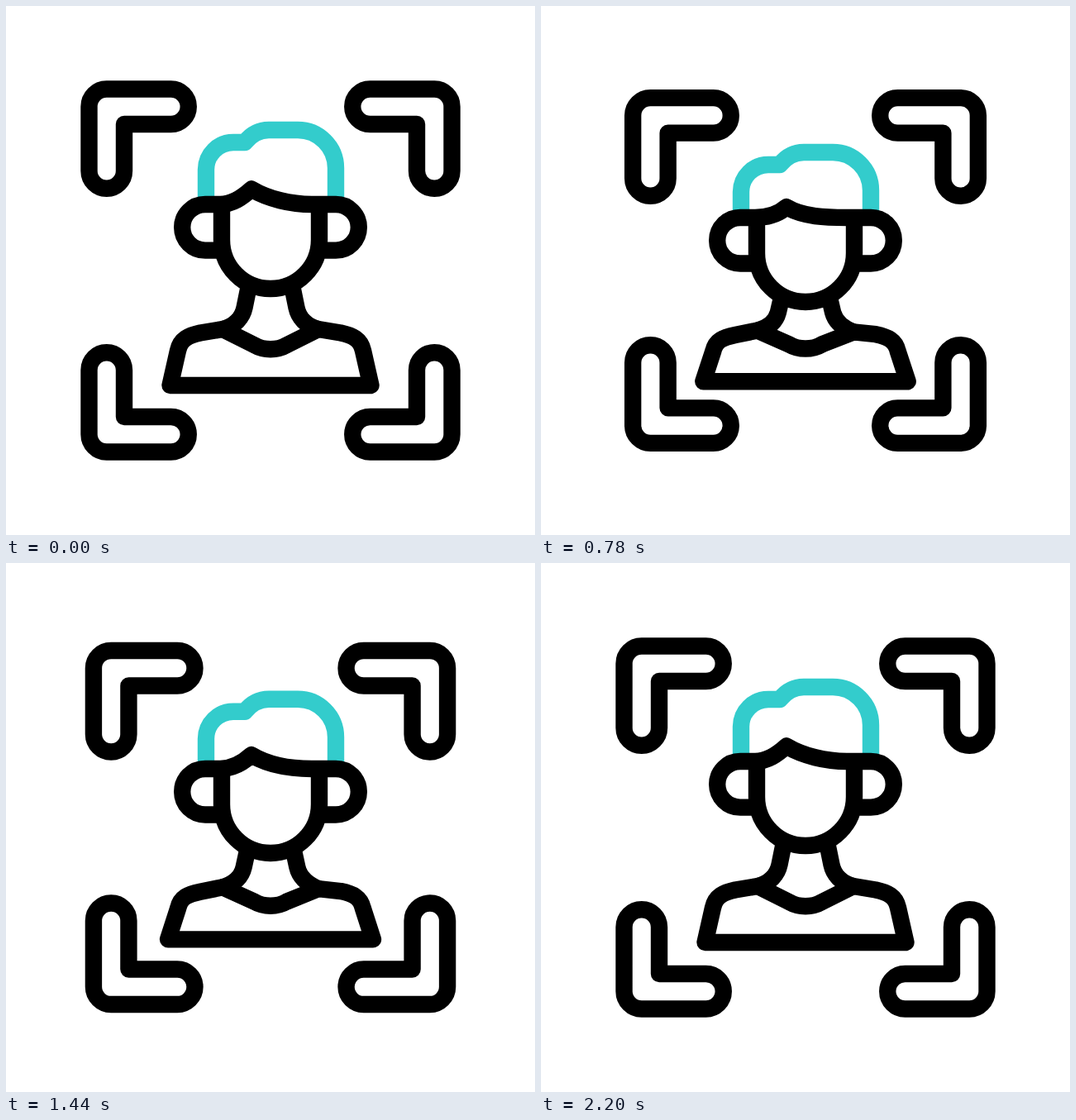
An HTML page for the animation above (2280 ms loop, 640x640 px).

```html
<!DOCTYPE html>
<html lang="en">
<head>
<meta charset="utf-8">
<title>Face scan</title>
<style>
  html, body { margin: 0; width: 100%; height: 100%; overflow: hidden; background: #fff; }
  svg { display: block; width: 100vw; height: 100vh; }
  path { fill: none; stroke: #000; stroke-width: 20.4; stroke-linejoin: round; }
  #hair { stroke: #33cccc; }
</style>
</head>
<body>
<svg viewBox="0 0 640 640">
  <g id="frame"></g>
  <path id="hair"/>
  <path id="neck"/>
  <path id="body"/>
  <path id="head"/>
</svg>
<script>
const LOOP = 2280, START = 200, STEP = 20, LAST = 100;
const $ = id => document.getElementById(id);

// Weights of the squeezed and the stretched pose: [step, squeeze, stretch]
const track = (in1, out1, hold, in2, out2, squeeze, stretch) => [
  [0, 0, 0], [in1, 1, 0], [out1, 0, 1], [hold, 0, 1],
  [in2, squeeze, 0], [out2, 0, stretch], [LAST, 0, 0]
];
const tracks = {
  frame: track(21, 43.4, 54, 68, 82.5, 1, .5),
  body: track(21, 45, 53, 67, 87.4, 1, .5),
  head: track(21, 45.5, 53, 67, 88.7, .7, 0),
  fringe: track(22, 46.7, 53, 67, 92, .74, 0),
  hair: track(22, 47.3, 53, 67, 94.4, .78, 0)
};

// Returns a function that blends a resting value with its two pose offsets
function pose(keys, step) {
  let i = 1;
  while (i < keys.length - 1 && step > keys[i][0]) i++;
  const a = keys[i - 1], b = keys[i];
  const t = (step - a[0]) / (b[0] - a[0]);
  const u = t * t * (3 - 2 * t);
  const squeeze = a[1] + (b[1] - a[1]) * u;
  const stretch = a[2] + (b[2] - a[2]) * u;
  return (rest, dSqueeze, dStretch) => rest + squeeze * dSqueeze + stretch * dStretch;
}

const corners = [0, 90, 180, 270].map(angle => {
  const p = document.createElementNS("http://www.w3.org/2000/svg", "path");
  p.setAttribute("transform", `rotate(${angle} 320 320)`);
  return $("frame").appendChild(p);
});

function cornerPath(v) {
  const r = 21.25, a = v(100.5, 25.5, -25.5), end = v(220.75, 12.75, 0) - r;
  const b = a + 2 * r;
  return `M${a + r} ${a}H${end}A${r} ${r} 0 0 1 ${end} ${b}H${b}V${end}` +
    `A${r} ${r} 0 0 1 ${a} ${end}V${a + r}A${r} ${r} 0 0 1 ${a + r} ${a}Z`;
}

function hairPath(dy, bottom) {
  return `M242 ${bottom}V${198 + dy}A33 33 0 0 1 275 ${165 + dy}H289` +
    `C296 ${156 + dy} 305 ${150 + dy} 318 ${150 + dy}H353` +
    `A46 46 0 0 1 399 ${196 + dy}V${bottom}`;
}

function headPath(dy, tip) {
  const top = 240 + dy, low = 295.6 + dy, jaw = 283 + dy;
  return `M261 ${low}H241A27.8 27.8 0 0 1 241 ${top}H259` +
    `C274 ${top} 286 ${tip + 10} 297 ${tip}` +
    `C317 ${tip + 12} 345 ${top} 370 ${top}H399` +
    `A27.8 27.8 0 0 1 399 ${low}H379` +
    `M261 ${top}V${jaw}A59 59 0 0 0 379 ${jaw}V${top}`;
}

function neckPath(h, left, right) {
  const side = (x, joint) =>
    `M${x(294 - .2 * h)} ${338 + h}L${x(288.5 - .1 * h)} ${365 + .35 * h}` +
    `C${x(286 - .1 * h)} ${377 + .2 * h} ${x(277)} ${387 + .1 * h} ${x(262)} ${joint}`;
  return side(x => x, left) + side(x => 640 - x, right);
}

function bodyPath(v, left, right) {
  const footX = v(198.5, 0, -8.5), footY = v(459, -14, 21.5);
  const sideX = v(208, 1, -2), sideY = v(417, .5, 2);
  const arm = v(395.5, 4, -2), arm2 = v(395.5, 3, -2);
  const collar = v(410, -2.5, 4.5);
  return `M${footX} ${footY}L${sideX} ${sideY}` +
    `C${sideX + 3} ${sideY - 14} 221 ${arm + 3} 235 ${arm}L262 ${left}` +
    `L300 ${collar}C312 ${collar + 7} 328 ${collar + 7} 340 ${collar}L378 ${right}` +
    `L405 ${arm2}C419 ${arm2 + 3} ${637 - sideX} ${sideY - 14} ${640 - sideX} ${sideY}` +
    `L${640 - footX} ${footY}Z`;
}

function draw(time) {
  const step = Math.max(0, Math.min(LAST, Math.floor((time % LOOP - START) / STEP)));
  const at = name => pose(tracks[name], step);
  const body = at("body");
  const headY = at("head")(0, 25.5, -12.75);
  const hairY = at("hair")(0, 38.25, -22);
  const tip = at("fringe")(221.5, 32, -21);
  const left = body(391, 3.5, -4), right = body(391, 6, -4);

  const corner = cornerPath(at("frame"));
  corners.forEach(p => p.setAttribute("d", corner));
  $("hair").setAttribute("d", hairPath(hairY, 240 + headY));
  $("neck").setAttribute("d", neckPath(headY, left, right));
  $("body").setAttribute("d", bodyPath(body, left, right));
  $("head").setAttribute("d", headPath(headY, tip));
}

const begin = performance.now();
function tick() {
  draw(performance.now() - begin);
  requestAnimationFrame(tick);
}
tick();
</script>
</body>
</html>
```
